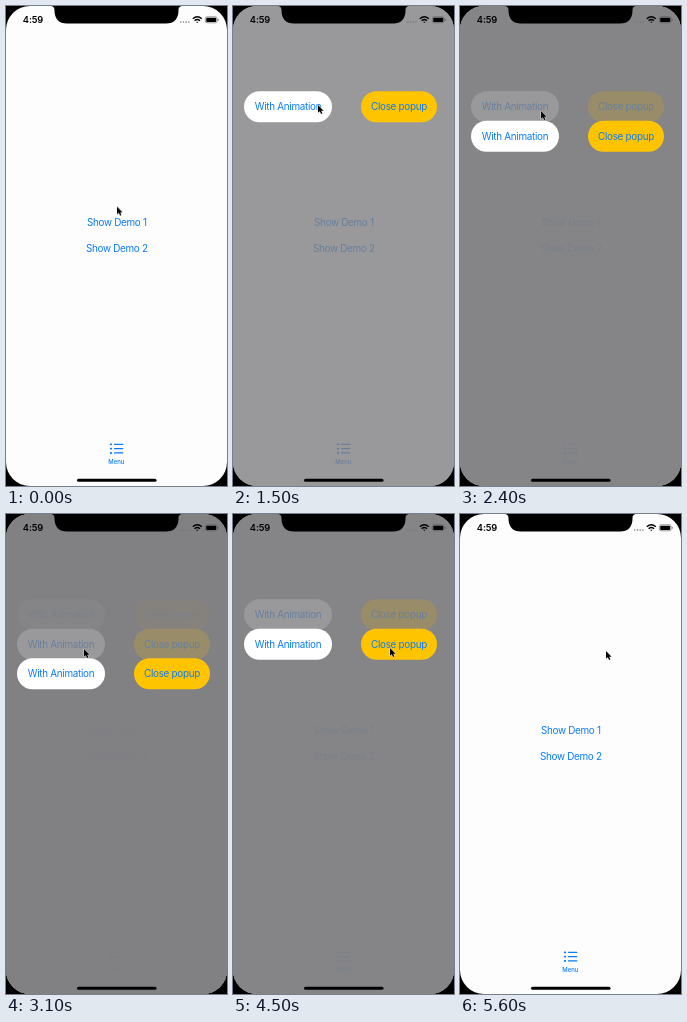
Write an HTML page that moves like this. It is 221 px wide and 480 px high and loops after 5.7 s.

```html
<!DOCTYPE html>
<html lang="en">
<head>
<meta charset="utf-8">
<title>Stacked popups</title>
<style>
html, body { margin: 0; width: 100%; height: 100%; overflow: hidden; background: #000; }
svg { display: block; width: 100%; height: 100%; }
text { font: 9.9px Inter, "Liberation Sans", sans-serif; letter-spacing: -.3px; text-anchor: middle; fill: #087bfb; }
.clock { font-size: 9.3px; font-weight: 600; letter-spacing: -.1px; fill: #000; }
.tab { font-size: 5.9px; font-weight: 500; letter-spacing: 0; }
.popup, #cursor { animation: 5.7s linear infinite; }
.popup { opacity: 0; }
#p1 { animation-name: first; }
#p2 { animation-name: second; }
#p3 { animation-name: third; }
#cursor { animation-name: move; animation-timing-function: ease-in-out; }

/* opens at 0.45 s, closes at 5.25 s */
@keyframes first {
  0%, 7.9% { opacity: 0; animation-timing-function: ease-in-out; }
  14%, 92.9% { opacity: 1; animation-timing-function: ease-in-out; }
  97.8%, 100% { opacity: 0; }
}
@keyframes second {
  0%, 28% { opacity: 0; animation-timing-function: ease-in-out; }
  34.2%, 79.8% { opacity: 1; animation-timing-function: ease-in-out; }
  85.1%, 100% { opacity: 0; }
}
@keyframes third {
  0%, 47.4% { opacity: 0; animation-timing-function: ease-in-out; }
  53.4%, 62.3% { opacity: 1; animation-timing-function: ease-in-out; }
  67.5%, 100% { opacity: 0; }
}
@keyframes move {
  0% { transform: translate(111px, 200.5px); }
  5.26%, 8.77% { transform: translate(111px, 212px); }
  17.54% { transform: translate(75px, 124px); }
  22.81% { transform: translate(84px, 99px); }
  26.32%, 35.09% { transform: translate(85px, 99px); }
  42.11% { transform: translate(81px, 105px); }
  45.61%, 50% { transform: translate(78px, 131px); }
  54.39%, 56.14% { transform: translate(78px, 135px); }
  61.4%, 67.5% { transform: translate(157px, 165px); }
  75.44%, 82% { transform: translate(157px, 134px); }
  87.72% { transform: translate(157px, 107.5px); }
  89.47%, 93.5% { transform: translate(157px, 108.5px); }
  98.25%, 100% { transform: translate(146px, 137px); }
}
</style>
</head>
<body>
<svg viewBox="0 0 221 480" preserveAspectRatio="none">
  <defs>
    <clipPath id="screen"><rect width="221" height="480" rx="24"/></clipPath>
    <g id="buttons">
      <rect x="11" y="85.3" width="88" height="31" rx="15.5" fill="#fff"/>
      <rect x="128" y="85.3" width="76" height="31" rx="15.5" fill="#ffc400"/>
      <text x="55" y="104.4">With Animation</text>
      <text x="166" y="104.4">Close popup</text>
    </g>
    <rect id="dim" width="221" height="480" fill="#808084" fill-opacity=".8"/>
  </defs>

  <g clip-path="url(#screen)">
    <rect width="221" height="480" fill="#fdfdfd"/>
    <text x="110.8" y="219.5">Show Demo 1</text>
    <text x="110.8" y="245.8">Show Demo 2</text>
    <g stroke="#087bfb" stroke-linecap="round">
      <path d="M108.5 438.3h8.3M108.5 442.6h8.3M108.5 446.9h8.3" stroke-width="1.2"/>
      <path d="M104.7 438.3h.6M104.7 442.6h.6M104.7 446.9h.6" stroke-width="1.8"/>
    </g>
    <text class="tab" x="110.3" y="458.2">Menu</text>

    <g class="popup" id="p1"><use href="#dim"/><use href="#buttons"/></g>
    <g class="popup" id="p2"><use href="#dim"/><use href="#buttons" y="29.5"/></g>
    <g class="popup" id="p3"><use href="#dim"/><use href="#buttons" y="59"/></g>
  </g>

  <path d="M44 0C47.5 0 48.5 1.5 48.5 4.500C48.500 13 53 17.500 61 17.500H160C168 17.500 172.500 13 172.500 4.500C172.500 1.500 173.500 0 177 0Z"/>
  <text class="clock" x="27" y="17">4:59</text>
  <g fill="#77777b">
    <circle cx="174.800" cy="16" r=".8"/><circle cx="177.500" cy="16" r=".8"/>
    <circle cx="180.200" cy="16" r=".8"/><circle cx="182.900" cy="16" r=".8"/>
  </g>
  <g fill="none" stroke="#000" stroke-width="1.400">
    <path d="M186.800 12.800Q191.300 8.800 195.800 12.800M188.600 14.700Q191.300 12.400 194 14.700"/>
    <path d="M190 15.700h2.600l-1.300 1.300z" fill="#000" stroke="none"/>
    <rect x="199.300" y="10.800" width="11.800" height="6" rx="1.800" stroke="#555" stroke-width=".6"/>
    <rect x="200.200" y="11.700" width="10" height="4.200" rx="1" fill="#000" stroke="none"/>
    <path d="M212.200 12.900v1.800" stroke="#555" stroke-width=".8"/>
  </g>
  <rect x="71" y="472.800" width="79.500" height="3" rx="1.500"/>

  <path id="cursor" d="M0 0V7.800L1.800 6.200 3.100 9 4.400 8.400 3.200 5.700H5.600Z" stroke="#fff" stroke-width=".7" paint-order="stroke"/>
</svg>
</body>
</html>
```
